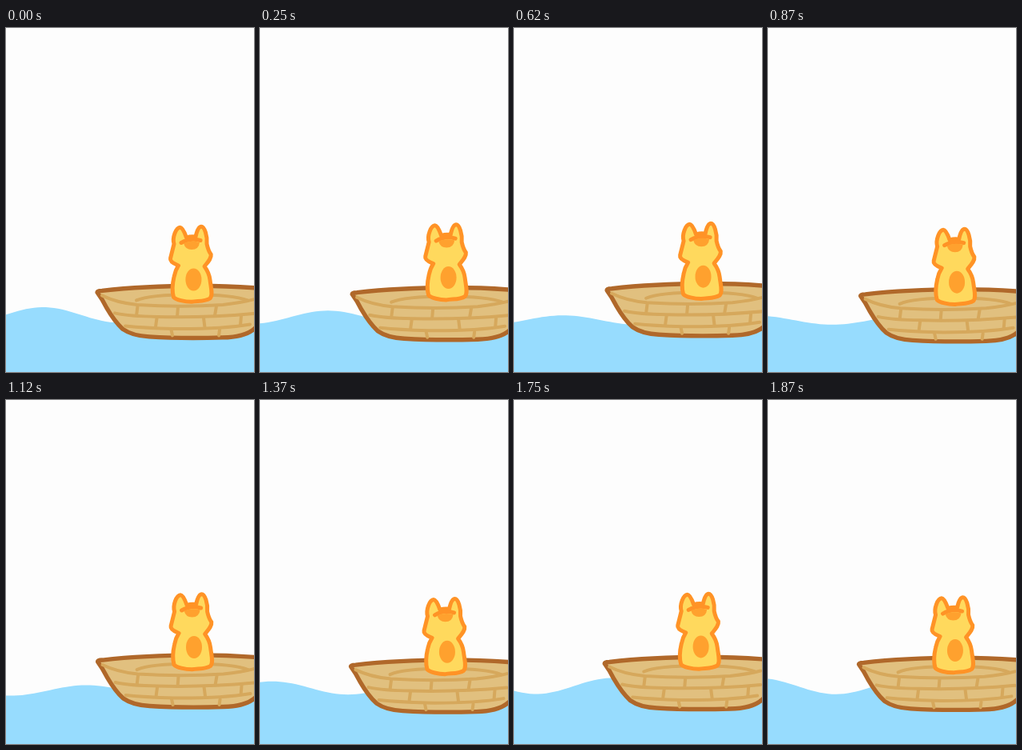
Write an HTML page that moves like this. It is 310x430 px and loops after 2000 ms.

```html
<!DOCTYPE html>
<html lang="en">
<head>
<meta charset="utf-8">
<title>Cat in a boat</title>
<style>
  html, body { margin: 0; width: 100%; height: 100%; overflow: hidden; background: #fdfdfd; }
  svg { display: block; width: 310px; height: 430px; }
  path { stroke-linecap: round; stroke-linejoin: round; }
</style>
</head>
<body>
<svg viewBox="0 0 310 430">
  <path id="sea" fill="#97dcfe"/>
  <g id="boat">
    <path fill="#e1c07f" stroke="#b0682a" stroke-width="5.4"
      d="M115 330Q115 328 121 328Q172 322 240 321.800Q288 321.800 330 326L345 340Q326 363 312 375Q300 386 272 386.500Q220 388 180 385.500Q159 384.500 147 376Q137 367 126.500 349Q121 338 115 330Z"/>
    <g fill="none" stroke="#d6a85c" stroke-width="4">
      <path d="M121 334Q139 343 165 345.500Q220 349 272 345.500Q295 343 310 339"/>
      <path d="M164 340Q180 333 233 332.500Q285 333 303 340"/>
      <path d="M137 356Q155 360 190 360.500Q250 362 310 356.500"/>
      <path d="M150 372Q175 374.500 210 375.500Q270 376 306 370"/>
      <path d="M165.500 347L164 359M216 348L215 360M264 347L262 359M189.500 362L188 373M248 362L249.500 374M295 359L294 371M207.500 377L209 384M268 377L267 384"/>
    </g>
  </g>
  <g id="cat">
    <path fill="#ffd95d" stroke="#ff9326" stroke-width="5"
      d="M211 270C208.500 262 213.500 249.500 218.500 249.200Q222 249 226.500 262Q232 260 238 261C239.500 254 241.500 248.200 245 248.200C249 248.200 253 260 252 270Q254 279 257.200 283C258 288 253 293 249 298Q255 306 256 315C257 324 260 334 256 338C250 342 241 341 233 342.300C224 342.300 214 340 210.500 336.500Q207.500 326 211 311Q212.500 303 216.500 297C211.500 295 205.500 292 206.500 288Q208.500 280 211 270Z"/>
    <path fill="none" stroke="#ff9326" stroke-width="5" d="M220 268.500Q231 262 244 265.500"/>
    <path fill="#ffa12e" d="M223 269Q233 265 243 268Q242 277 233 277Q225 277 223 269Z"/>
    <ellipse cx="235.400" cy="314.500" rx="10" ry="14" fill="#ffa12e"/>
  </g>
</svg>
<script>
const $ = id => document.getElementById(id);
const LOOP = 2000, STEP = 125, WAVELENGTH = 190;

// Cosine running a whole number of cycles per loop, at its top on pose `peak`
const cycle = (i, count, peak) => Math.cos(2 * Math.PI * count * (i - peak) / 16);

function seaPath(i) {
  const crest = 35 + WAVELENGTH * i / 4 + 20 * cycle(i, 4, 0) - 28 * cycle(i, 1, 3.2);
  const level = 361.5 + 4 * cycle(i, 1, 6);
  const height = 7.8 + 2.2 * cycle(i, 1, 14.5);
  let d = 'M0 430';
  for (let x = 0; x <= 310; x += 5) {
    d += `L${x} ${level - height * Math.cos(2 * Math.PI * (x - crest) / WAVELENGTH)}`;
  }
  return d + 'V430Z';
}

const place = (id, x, y) => $(id).setAttribute('transform', `translate(${x} ${y})`);

function draw(now) {
  // Poses are held and change on whole hundredths of a second
  const t = Math.floor(now % LOOP / 10) * 10;
  const i = Math.floor((t + 9) / STEP);
  const sway = -.4 + 1.5 * cycle(i, 1, 5);
  const roll = 2.3 * cycle(i, 3, 1.48);
  $('sea').setAttribute('d', seaPath(i));
  place('boat', sway, .8 + 1.8 * cycle(i, 4, 3) + roll);
  place('cat', sway, -1.7 + 3.5 * cycle(i, 4, 3.48) + 1.2 * cycle(i, 1, 5) + .65 * roll);
}

const start = performance.now();
function tick() {
  draw(performance.now() - start);
  requestAnimationFrame(tick);
}
tick();
</script>
</body>
</html>
```
